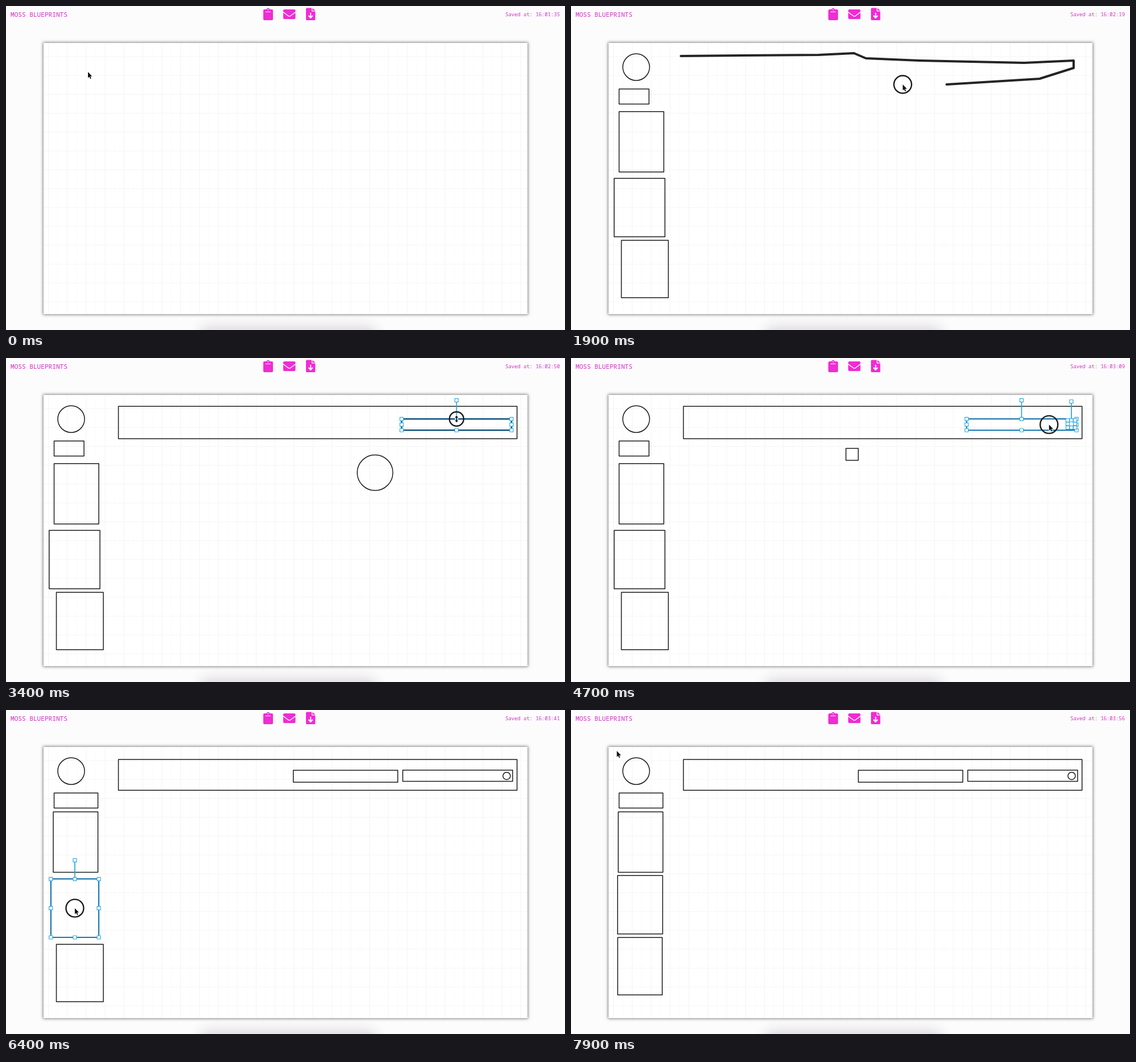
An HTML page with a canvas for the animation above (8 s loop, 982 by 570 pixels).

```html
<!DOCTYPE html>
<html lang="en">
<head>
<meta charset="utf-8">
<title>Wireframe sketching</title>
<style>
html, body { margin: 0; width: 100%; height: 100%; overflow: hidden; background: #fcfcfc; }
.stage { position: relative; width: 982px; height: 570px; overflow: hidden; }
.stage > * { position: absolute; }
.label { top: 7px; font-family: "Noto Sans Mono", "DejaVu Sans Mono", monospace; color: #d62cc2; white-space: pre; line-height: 16px; }
.title { left: 8px; font-size: 11.1px; }
.saved { right: 9px; font-size: 8.9px; }
.board {
  left: 66px; top: 65px; width: 849.5px; height: 477px;
  background:
    linear-gradient(90deg, #f5f5f5 1px, transparent 1px) 8px 0 / 33.2px 33.2px,
    linear-gradient(#f5f5f5 1px, transparent 1px) 0 23.6px / 33.2px 33.2px,
    linear-gradient(90deg, #fbfbfb 1px, transparent 1px) 8px 0 / 16.6px 16.6px,
    #fff;
  box-shadow: 0 0 5px 1px rgba(0, 0, 0, .5);
}
.tray { left: 346px; top: 570px; width: 300px; height: 40px; border-radius: 12px; box-shadow: 0 0 20px 8px rgba(70, 40, 85, .15); }
canvas, svg { left: 0; top: 0; }
</style>
</head>
<body>
<div class="stage">
  <div class="board"></div>
  <div class="tray"></div>
  <div class="label title">MOSS BLUEPRINTS</div>
  <div class="label saved" id="saved"></div>
  <svg width="982" height="30" fill="#f02cd3">
    <path d="M454 6h3.6a3 3 0 0 1 5.8 0H467a2 2 0 0 1 2 2v15a2 2 0 0 1-2 2H454a2 2 0 0 1-2-2V8a2 2 0 0 1 2-2Z"/>
    <path d="M456 10.3h9" stroke="#fcfcfc"/>
    <circle cx="460.5" cy="6.4" r="1" fill="#fcfcfc"/>
    <rect x="487" y="6" width="21.5" height="17" rx="2"/>
    <path d="M486.5 10.5l9.3 6.8q2 1.3 4 0l9.2-6.8" fill="none" stroke="#fcfcfc" stroke-width="1.4"/>
    <path d="M528.5 3.5H537v6h6.3v14a1.5 1.5 0 0 1-1.5 1.5H528.5a1.5 1.5 0 0 1-1.5-1.5V5a1.5 1.5 0 0 1 1.5-1.5ZM538.2 3.5l5.1 4.8h-5.1Z"/>
    <path d="M535.1 12v8M531.5 17l3.6 3.8l3.6-3.8" fill="none" stroke="#fcfcfc" stroke-width="2"/>
  </svg>
  <canvas id="sketch" width="982" height="570"></canvas>
</div>
<script>
const STEP = 100, LOOP = 8000, LAG = .0533;
const INK = '#1c1c1c';
const ctx = document.getElementById('sketch').getContext('2d');
const saved = document.getElementById('saved');

const clamp = f => Math.max(0, Math.min(1, f));
const mix = (a, b, f) => a.map((v, i) => v + (b[i] - v) * f);
const progress = (span, s) => clamp((s - span.from) / (span.to - span.from || 1));

// All times are in steps. A box is [left, top, right, bottom].
const shapes = [], edits = [], events = [];

// The first part of a polyline, by share of its length.
function cut(pts, share) {
  const lens = pts.slice(1).map((p, i) => Math.hypot(p[0] - pts[i][0], p[1] - pts[i][1]));
  let rest = lens.reduce((a, b) => a + b) * clamp(share);
  const out = [pts[0]];
  for (let i = 0; i < lens.length; i++) {
    out.push(mix(pts[i], pts[i + 1], Math.min(1, rest / lens[i])));
    if (rest <= lens[i]) break;
    rest -= lens[i];
  }
  return out;
}

const rectPath = ([l, t, r, b]) => [[l, t], [r, t], [r, b], [l, b], [l, t]];

function circlePath([l, t, r, b]) {
  return Array.from({ length: 25 }, (_, i) => {
    const a = i / 12 * Math.PI, k = (r - l) / 2 * (1 + .04 * Math.sin(2 * a));
    return [(l + r) / 2 + k * Math.sin(a), (t + b) / 2 - k * Math.cos(a)];
  });
}

// A freehand stroke that snaps to a clean shape when it ends.
function sketch(from, to, box, round, path = (round ? circlePath : rectPath)(box)) {
  const shape = { from, to, box, round, path };
  shapes.push(shape);
  events.push({ from, to, hold: true, at: s => cut(path, progress(shape, s)).pop() });
  return shape;
}

// A drag that shifts the box edges; grip is the held place as shares of the box.
function edit(shape, from, to, shift, grip) {
  const resize = !!grip && grip.some(g => g === 0 || g === 1);
  edits.push({ shape, from, to, shift, resize });
  if (!grip) return;
  events.push({
    from, to, hold: true, vertical: grip[1] === 0,
    at(s) {
      const [l, t, r, b] = boxAt(shape, s);
      return [l + (r - l) * grip[0], t + (b - t) * grip[1]];
    }
  });
}
const move = (shape, from, to, x, y, grip = [.5, .5]) => edit(shape, from, to, [x, y, x, y], grip);
const rest = (step, x, y) => events.push({ from: step, to: step, at: () => [x, y] });

function boxAt(shape, s) {
  return edits.filter(e => e.shape === shape)
    .reduce((box, e) => box.map((v, i) => v + e.shift[i] * progress(e, s)), shape.box);
}

sketch(1, 3.5, [91, 84, 138, 131], true);
const label = sketch(4, 5.6, [84.5, 146, 137, 172.5]);
const cards = [
  sketch(6.2, 8.5, [84.5, 185.8, 163, 292]),
  sketch(9.5, 11.5, [75.8, 303.3, 165, 406]),
  sketch(12.3, 14.3, [88.5, 412.3, 171, 513.3])
];
const header = sketch(15, 20.73, [197.5, 85, 897.7, 142], false, [
  [193, 88], [300, 87], [435, 86], [497, 83], [518, 92], [612, 96], [796, 100],
  [883, 96], [883, 109], [823, 128], [660, 138], [583, 138], [200, 141], [193, 88]
]);
const bar = sketch(22.5, 25.5, [695, 100, 888, 127]);
const dot = sketch(27, 29.5, [617, 170.5, 679.6, 233], true);
const field = sketch(43, 45, [483, 159, 504.6, 180]);

rest(0, 144, 116);
edit(bar, 31, 34, [0, 7.3, 0, 0], [.5, 0]);
edit(dot, 37, 39, [0, 0, -49.6, -49.6], [1, 1]);
move(dot, 40, 42, 255.5, -61);
move(bar, 47, 49, 2, -1.5, [.75, .5]);
edit(dot, 47, 49, [.5, 0, .5, 0]);
edit(header, 50, 52, [0, 2, 0, -.8], [.5, 0]);
move(field, 54, 55, 21.7, -53);
edit(field, 56, 57, [0, 0, 162, 0], [1, .5]);
rest(58, 423.5, 183);
edit(label, 59, 60, [0, 0, 24.5, 0], [1, .5]);
move(cards[0], 61, 62, -1.5, -6.5);
edit(cards[1], 63, 65, [6, -12, -4, -12], [.5, .5]);
edit(cards[2], 66, 68, [-6.5, -12, -10.7, -12], [.5, .5]);
rest(70, 199, 179.5);
rest(79, 80.5, 72);
events.sort((a, b) => a.from - b.from);

function pointerAt(s) {
  const last = events.filter(e => e.from <= s).pop();
  if (s <= last.to) return { ...last, pos: last.at(s) };
  const next = events.find(e => e.from > s) || last;
  const gap = { from: last.to, to: next.from };
  return { pos: mix(last.at(last.to), next.at(next.from), progress(gap, s)) };
}

// [step, seconds past the hour]
const saves = [[0, 95], [19, 139], [34, 170], [47, 189], [58, 211], [70, 230], [79, 236]];

function savedText(s) {
  const i = Math.max(1, saves.findIndex(k => k[0] >= s));
  const [a, b] = [saves[i - 1], saves[i]];
  const sec = Math.round(a[1] + (b[1] - a[1]) * (s - a[0]) / (b[0] - a[0]));
  const pad = n => String(n).padStart(2, '0');
  return `Saved at: 16:${pad(Math.floor(sec / 60))}:${pad(sec % 60)}`;
}

function line(pts, color, width) {
  ctx.strokeStyle = color;
  ctx.lineWidth = width;
  ctx.beginPath();
  pts.forEach(p => ctx.lineTo(...p));
  ctx.stroke();
}

function outline(shape, [l, t, r, b], color, width) {
  ctx.strokeStyle = color;
  ctx.lineWidth = width;
  ctx.beginPath();
  if (shape.round) ctx.ellipse((l + r) / 2, (t + b) / 2, (r - l) / 2, (b - t) / 2, 0, 0, 7);
  else ctx.rect(l, t, r - l, b - t);
  ctx.stroke();
}

function selection({ shape, resize }, [l, t, r, b]) {
  const x = (l + r) / 2, y = (t + b) / 2, top = t - 33;
  outline(shape, [l, t, r, b], resize ? '#0e507c' : '#1478b6', resize ? 2.6 : 2.1);
  line([[x, t], [x, top]], '#35a6d6', 1.8);
  const spots = [[x, top]];
  for (const hx of [l, x, r]) for (const hy of [t, y, b])
    if (hx !== x || hy !== y) spots.push([hx, hy]);
  ctx.fillStyle = '#fff';
  for (const [hx, hy] of spots) {
    ctx.fillRect(hx - 3, hy - 3, 6, 6);
    outline({}, [hx - 3, hy - 3, hx + 3, hy + 3], '#35a9dc', 1.2);
  }
}

const arrowIcon = new Path2D('M0 0V10.5L2.4 8.4L4 12.2L5.7 11.5L4.1 7.7H7.3Z');
const resizeIcon = new Path2D('M0-6L3-2.5H1V2.5H3L0 6L-3 2.5H-1V-2.5H-3Z');

function drawPointer({ pos, hold, vertical }) {
  ctx.save();
  ctx.translate(...pos);
  const radius = vertical ? 12.5 : 15.5;
  if (hold) outline({ round: true }, [-radius, -radius, radius, radius], INK, 2.4);
  const icon = vertical ? resizeIcon : arrowIcon;
  ctx.strokeStyle = '#fff';
  ctx.lineWidth = 1.6;
  ctx.stroke(icon);
  ctx.fillStyle = '#111';
  ctx.fill(icon);
  ctx.restore();
}

function draw(s) {
  ctx.clearRect(0, 0, 982, 570);
  ctx.lineCap = ctx.lineJoin = 'round';
  for (const shape of shapes) {
    if (s >= shape.to) outline(shape, boxAt(shape, s), INK, 1.5);
    else if (s >= shape.from) line(cut(shape.path, progress(shape, s) - LAG), '#242424', 4);
  }
  const latest = Math.max(...edits.map(e => e.from).filter(from => from <= s));
  edits.filter(e => e.from === latest && s <= e.to + 1)
    .forEach(e => selection(e, boxAt(e.shape, s)));
  drawPointer(pointerAt(s));
  saved.textContent = savedText(s);
}

const began = performance.now();
function tick() {
  draw(Math.floor((performance.now() - began) % LOOP / STEP));
  requestAnimationFrame(tick);
}
tick();
</script>
</body>
</html>
```
